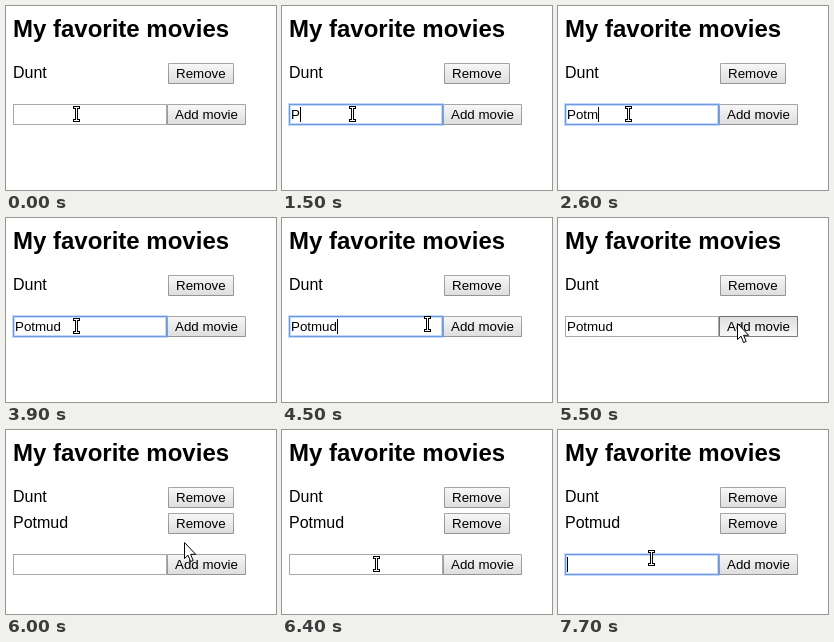
Write an HTML page that moves like this. It is 270 by 184 pixels and loops after 8 s.

```html
<!DOCTYPE html>
<html lang="en">
<head>
<meta charset="utf-8">
<title>My favorite movies</title>
<style>
  html, body { margin: 0; width: 100%; height: 100%; overflow: hidden; background: #fff; }
  body { position: relative; color: #000; font: 16px/17px "Liberation Sans", Arial, sans-serif; }
  body *, svg { position: absolute; box-sizing: border-box; white-space: pre; }
  h2 { left: 7px; top: 9px; margin: 0; font-size: 24px; line-height: 27px; }
  .row { left: 7px; }
  .row .button { left: 155px; top: -1px; width: 66px; }
  .button, #field { height: 21px; font-size: 13.3333px; line-height: 15px; }
  .button {
    padding: 3px 8px; border-radius: 1px;
    background: linear-gradient(#f8f8f8, #ddd);
    box-shadow: inset 0 0 0 1px rgba(0, 0, 0, .333);
  }
  .hover { box-shadow: inset 0 0 0 1px rgba(0, 0, 0, .5); }
  .pressed { background: linear-gradient(#ddd, #f8f8f8); }
  #form { left: 0; width: 270px; height: 23px; }
  #field { left: 7px; top: 0; width: 154px; border: 1px solid #a9a9a9; background: #fff; }
  #field.focus { border-color: #7099de; box-shadow: 0 0 0 1px #c1d9ff, inset 0 0 0 1px #c1d9ff; }
  #typed { left: 1px; top: 2px; }
  #caret { top: 3px; width: 1px; height: 15px; background: #000; }
  #add { left: 161px; top: 0; width: 79px; }
  svg { left: 0; top: 0; width: 270px; height: 184px; }
</style>
</head>
<body>
<h2>My favorite movies</h2>
<div class="row" style="top:58px"><span>Dunt</span><div class="button">Remove</div></div>
<div class="row" id="added" style="top:84px"><span>Potmud</span><div class="button">Remove</div></div>
<div id="form">
  <div id="field"><span id="typed"></span></div>
  <div id="caret"></div>
  <div class="button" id="add">Add movie</div>
</div>
<svg viewBox="0 0 270 184">
  <g id="beam">
    <path d="M0 0H7V3H5V13H7V16H0V13H2V3H0Z"/>
    <path d="M1 1H6V2H4V14H6V15H1V14H3V2H1Z" fill="#fff"/>
  </g>
  <path id="arrow" d="M.5 .5V16.5L4 13.2L6.6 19.6L9.2 18.5L6.6 12.3H11.7Z" fill="#fff" stroke="#000"/>
</svg>
<script>
const $ = id => document.getElementById(id);
const LOOP = 8000, PRESS = 5500, ADD = 5600, REFOCUS = 7500;
const TITLE = "Potmud";
const KEYS = [1500, 1900, 2200, 2600, 3000, 3300];
const CARET_ON = [[400, 1000], [1500, 3900], [4400, 4900], [7500, 8000]];
const RETURN = [[179, 105], [178, 112], [168, 124], [140, 131], [108, 134], [95, 134]];

// The pointer moves in 100 ms ticks.
function pointer(t) {
  const step = (start, count) => Math.max(0, Math.min(count, Math.floor((t - start) / 100) + 1));
  if (t < 6000) {
    const k = 1 - (1 - step(4300, 9) / 9) ** 2.9;
    return [71 + 108 * k, 108 - 3 * k];
  }
  if (t < REFOCUS) return RETURN[step(6000, 5)];
  const k = step(REFOCUS, 3) / 3;
  return [95 - k, 134 - 6 * k];
}

function draw(t) {
  const added = t >= ADD;
  const top = added ? 124 : 98;
  const focused = t >= 400 && t < PRESS || t >= REFOCUS;
  const [x, y] = pointer(t).map(Math.round);
  const inForm = y >= top && y < top + 21;
  const overField = inForm && x >= 7 && x < 161;

  $("form").style.top = top + "px";
  $("added").hidden = !added;
  $("typed").textContent = added ? "" : TITLE.slice(0, KEYS.filter(k => k <= t).length);
  $("field").classList.toggle("focus", focused);
  $("caret").hidden = !CARET_ON.some(([from, to]) => t >= from && t < to);
  $("caret").style.left = Math.round(9 + $("typed").getBoundingClientRect().width) + "px";
  $("add").classList.toggle("hover", inForm && x >= 161 && x < 240);
  $("add").classList.toggle("pressed", t >= PRESS && t < ADD);

  $("beam").style.display = overField ? "" : "none";
  $("arrow").style.display = overField ? "none" : "";
  $("beam").setAttribute("transform", `translate(${x - 4} ${y - 8})`);
  $("arrow").setAttribute("transform", `translate(${x} ${y})`);
}

const start = performance.now();
function frame() {
  draw((performance.now() - start) % LOOP);
  requestAnimationFrame(frame);
}
frame();
</script>
</body>
</html>
```
